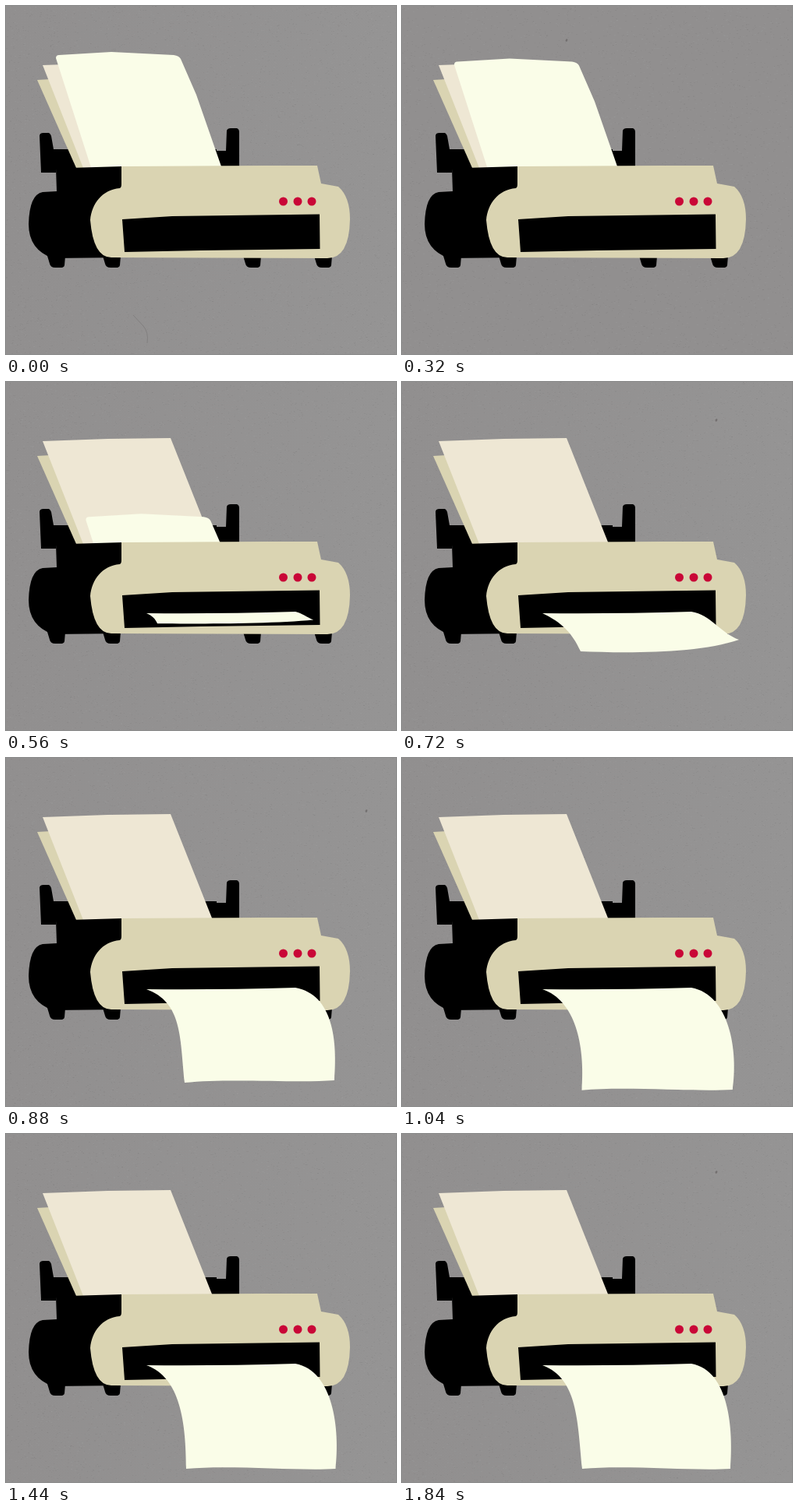
Animation of 500x447 px, one loop 2000 ms. Source, as an HTML page with a canvas:

```html
<!DOCTYPE html>
<html lang="en">
<head>
<meta charset="utf-8">
<title>Printer</title>
<style>
  html, body { margin: 0; width: 500px; height: 447px; overflow: hidden; background: #939191; }
  canvas { display: block; }
</style>
</head>
<body>
<canvas id="stage" width="500" height="447"></canvas>
<script>
const W = 500, H = 447, LOOP = 2000;
const ctx = document.getElementById('stage').getContext('2d');
const BEIGE = '#dad4b2', CREAM = '#eee7d4', PAPER = '#fafde8', RED = '#c90637', BLACK = '#000';

const span = (t, from, to) => Math.min(1, Math.max(0, (t - from) / (to - from)));
const mix = (a, b, p) => a + (b - a) * p;

// ---- Backdrop: seven grainy wall textures, cycled at 12 per loop ----
const SPECKS = { 2: [211, 44], 4: [403, 49], 5: [462, 68] };

function randomizer(seed) {
  return () => (seed = (seed * 16807) % 2147483647) / 2147483647;
}

function makeTexture(index) {
  const canvas = document.createElement('canvas');
  canvas.width = W;
  canvas.height = H;
  const c = canvas.getContext('2d');
  const shade = c.createLinearGradient(0, 0, W, 0);
  shade.addColorStop(0, '#918f8f');
  shade.addColorStop(1, '#959494');
  c.fillStyle = index === 2 ? '#918f8f' : shade;
  c.fillRect(0, 0, W, H);

  const random = randomizer(4021 + index * 977);
  for (let i = 0; i < 7000; i++) {
    c.fillStyle = random() < 0.6 ? 'rgba(0,0,0,.035)' : 'rgba(255,255,255,.03)';
    c.fillRect(Math.floor(random() * W), Math.floor(random() * H), 1 + Math.round(random()), 1);
  }
  if (SPECKS[index]) {
    const [x, y] = SPECKS[index];
    c.fillStyle = '#737070';
    c.beginPath();
    c.ellipse(x, y, 1.3, 1.9, 0.4, 0, 7);
    c.fill();
  }
  if (index === 0) {
    c.strokeStyle = '#7d7a7a';
    c.lineWidth = 0.8;
    c.stroke(new Path2D('M163 397L176 411Q183 419 181 433'));
  }
  return canvas;
}
const textures = Array.from({ length: 7 }, (_, i) => makeTexture(i));

// ---- Fixed shapes ----
const foot = x => `M${x} 321l3 10q1 5 7 5h9q3 -1 3 -3l1 -12Z`;
const shapes = {
  rear: 'M43 167Q43 163 48 163H55Q57 164 58 167L61 184H270V186H282L283 160Q284 157 288 157H296Q299 158 299 162V210H64V214H45Z',
  roller: 'M64 208.5L149 206V323L60 324Q29 313 29 280Q30 242 47 239L65 238Z',
  feet: [53, 124, 304, 395].map(foot).join(''),
  body: 'M148 206L330 205H399L404 228L426 232Q441 245 441 274Q440 324 412 324L135 323Q112 323 108 275C110 254 123 236 146 234Q148 233 148 229Z',
  slot: 'M149 274L213 270L402 267.5L402.5 312L250 314L152 316Z',
  back: 'M40 95L57 94L106 208H90Z',
  middle: 'M47 76L130 73L211 72L265 208H99Z',
  front: 'M64 67Q64 63 68 63L135 59L215 63Q222 64 224 68L244 114L276 206L340 382H165Z',
};
for (const name in shapes) shapes[name] = new Path2D(shapes[name]);

function fill(path, color) {
  ctx.fillStyle = color;
  ctx.fill(path);
}

// The sheet slides out of the slot, falls open, then swings once and settles
function drawPrintedSheet(t) {
  if (t <= 500) return;
  const out = span(t, 500, 720);
  const fall = span(t, 720, 880) ** 1.7;
  const settle = 1 - (1 - span(t, 880, 1200)) ** 2;
  const swing = Math.sin(Math.PI * span(t, 880, 1520));

  const lx = 181 + 48 * out + 2 * settle;
  const ly = 297 + 49 * out + 71 * fall + 13 * settle;
  const rx = 380 + 52 * out - 11 * fall + 4 * swing;
  const ry = 296 + 35 * out + 83 * fall + 16 * settle;

  ctx.beginPath();
  ctx.moveTo(180, 297);
  ctx.bezierCurveTo(
    181 + 24 * out + 21 * fall - 6 * swing, 297 + 12 * out + 5 * fall - 4 * swing,
    lx - 11 * out + 5 * fall + 15 * swing, ly - 24 * out - 35 * fall, lx, ly);
  ctx.bezierCurveTo(
    mix(lx, rx, 0.3), mix(ly, ry, 0.3) + 7 * out - 12 * fall,
    mix(lx, rx, 0.75), mix(ly, ry, 0.75) + 14 * out - 11 * fall, rx, ry);
  ctx.bezierCurveTo(
    rx - 24 * out + 28 * fall + 5 * swing, ry - 9 * out - 41 * fall,
    371 + 25 * out + 24 * fall, 295 + 4 * out + 5 * fall, 371, 295);
  ctx.quadraticCurveTo(270, 298, 180, 297);
  ctx.fillStyle = PAPER;
  ctx.fill();
}

function drawFeedSheet(t) {
  const drop = 0.001 * Math.max(0, t - 228) ** 2;
  if (drop > 148) return;
  ctx.save();
  ctx.beginPath();
  ctx.rect(0, 0, W, 208);
  ctx.clip();
  ctx.translate(drop * 0.348, drop);
  fill(shapes.front, PAPER);
  ctx.restore();
}

function draw(t) {
  ctx.drawImage(textures[Math.floor((t + 20) * 12 / LOOP) % 7], 0, 0);
  fill(shapes.rear, BLACK);
  fill(shapes.back, BEIGE);
  fill(shapes.middle, CREAM);
  drawFeedSheet(t);
  fill(shapes.roller, BLACK);
  fill(shapes.feet, BLACK);
  fill(shapes.body, BEIGE);
  fill(shapes.slot, BLACK);
  ctx.fillStyle = RED;
  for (const x of [355.5, 374, 392]) {
    ctx.beginPath();
    ctx.arc(x, 251, 5.5, 0, 7);
    ctx.fill();
  }
  drawPrintedSheet(t);
}

// The picture advances every 80 ms, or every 40 ms while a sheet speeds up or settles
function hold(t) {
  const step = (t >= 320 && t < 560) || (t >= 960 && t < 1200) ? 40 : 80;
  return Math.floor(t / step) * step;
}

function tick() {
  draw(hold(performance.now() % LOOP));
  requestAnimationFrame(tick);
}
tick();
</script>
</body>
</html>
```
